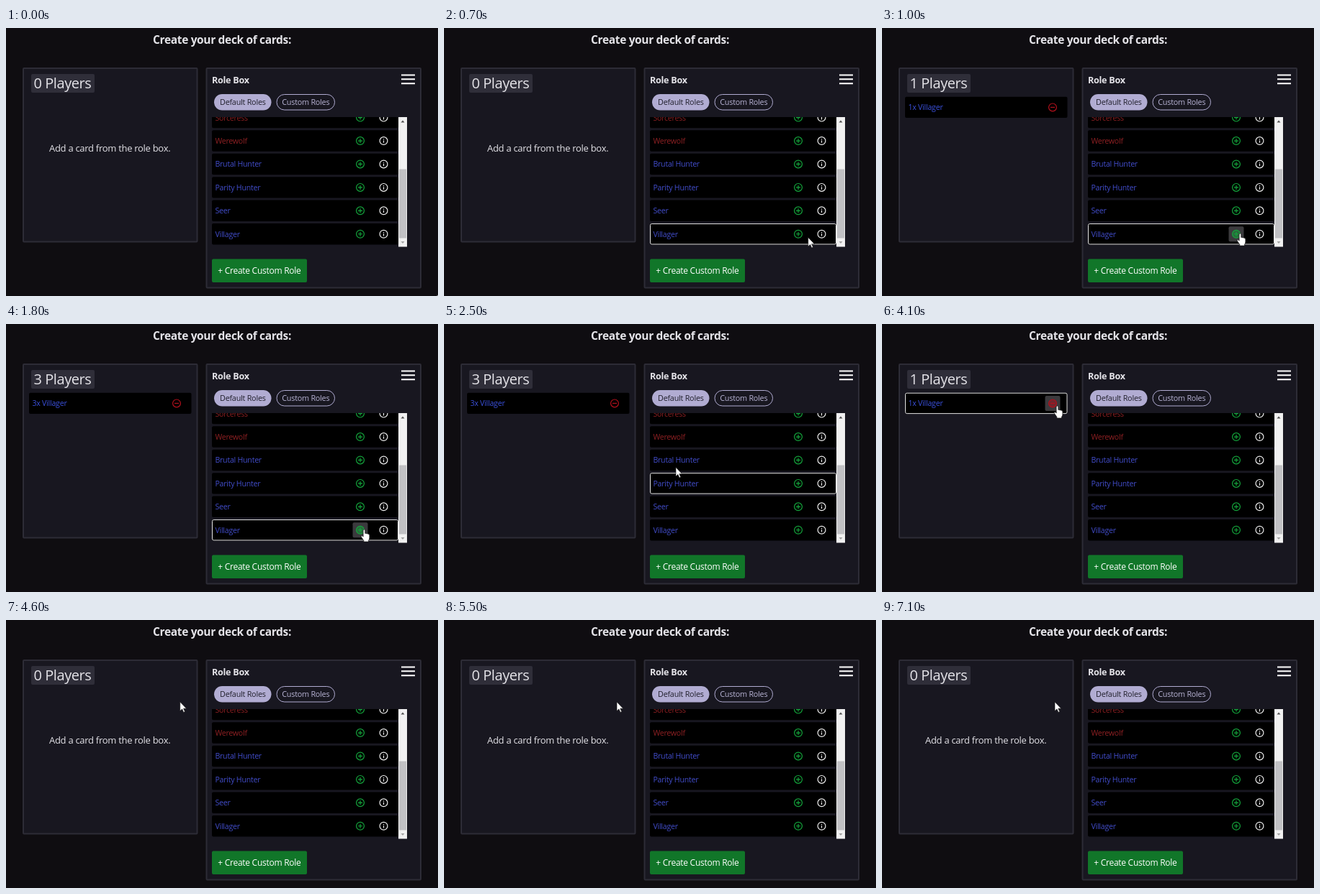
Animation, 600 px wide and 373 px high, one loop 7200 ms. Source, as an HTML page:

```html
<!DOCTYPE html>
<html lang="en">
<head>
<meta charset="utf-8">
<title>Deck builder</title>
<style>
html, body { margin: 0; width: 100%; height: 100%; overflow: hidden; background: #0f0d11; }
svg { display: block; width: 600px; height: 373px; }
text { font-family: "Open Sans", "Noto Sans", sans-serif; font-size: 10.6px; letter-spacing: -.022em; fill: #e4e3e8; }
.bold { font-weight: 700; }
.panel { fill: #181720; stroke: #2d2c36; stroke-width: 2; }
.icon { fill: none; stroke-width: 1.2; }
.hover { fill: none; stroke: #e2e2e2; }
.press { fill: #3b3a3d; }
</style>
</head>
<body>
<svg id="stage" viewBox="0 0 600 373">
  <rect width="600" height="373" fill="#0f0d11"/>
  <text class="bold" x="300" y="21.5" text-anchor="middle" style="font-size:15.5px">Create your deck of cards:</text>

  <rect class="panel" x="24" y="56" width="241.5" height="241.5" rx="1"/>
  <rect x="35" y="64" width="88" height="26" rx="2" fill="#2f2e39"/>
  <text id="total" x="38.5" y="84" style="font-size:20px"></text>
  <text id="empty" x="60" y="172.3" style="font-size:13px">Add a card from the role box.</text>
  <g id="deck"></g>

  <rect class="panel" x="278.5" y="56" width="297.5" height="305.5" rx="1"/>
  <text class="bold" x="286" y="77" style="font-size:12.6px">Role Box</text>
  <path d="M549 65.5h19M549 71.3h19M549 77.2h19" stroke="#fff" stroke-width="2"/>
  <rect x="289" y="92" width="79.5" height="22.5" rx="11.25" fill="#b1acd2"/>
  <text x="297" y="107" style="font-size:10.8px;fill:#201f2b">Default Roles</text>
  <rect x="376" y="92.5" width="80.5" height="21.5" rx="10.75" fill="none" stroke="#b1acd2"/>
  <text x="383.3" y="107" style="font-size:10.8px;fill:#b9b5d6">Custom Roles</text>

  <clipPath id="view"><rect x="285" y="124" width="272" height="180.5"/></clipPath>
  <g id="roles" clip-path="url(#view)"></g>
  <rect x="545" y="124" width="12" height="180.5" fill="#f1f1f1"/>
  <rect x="546" y="196.5" width="10" height="96" fill="#c1c1c4"/>
  <path d="M548.5 131.5l2.5-3 2.5 3z" fill="#505050"/>
  <path d="M548.5 297l2.5 3 2.5-3z" fill="#a3a3a3"/>

  <rect x="286" y="321.5" width="132" height="32.5" rx="2" fill="#117629"/>
  <text x="294.3" y="342.3" style="font-size:12px;fill:#fff">+ Create Custom Role</text>

  <circle id="ripple"/>
  <path id="arrow" d="M0 0v12.6l2.9-2.7 2 4.5 1.9-.8-2-4.4h4z" fill="#fff" stroke="#111" stroke-width=".6"/>
  <path id="hand" d="M-1.4.8Q0-.7 1.3.8V5.5Q2.6 4.7 3.7 6 5 5.2 5.8 6.6 7.3 6.2 7.4 8V12Q7.2 14 6 15.3V17H-.7V15.3L-4.2 10.3Q-4.6 8.4-3 8.6L-1.4 10Z" fill="#fff" stroke="#111" stroke-width=".7"/>
</svg>
<script>
const LOOP = 7200, STEP = 100;
const RED = '#8f2023', BLUE = '#424dcb', GREEN = '#14a53c', MINUS = '#b3101c';
const ROLES = ['Sorceress', 'Werewolf', 'Brutal Hunter', 'Parity Hunter', 'Seer', 'Villager'];
const ADD = [1000, 1400, 1800], REMOVE = [3700, 4100, 4500];
// time, x, y of the pointer tip
const PATH = [
  [0, 598.5, 371], [200, 585, 356], [400, 553, 325], [600, 514, 297], [800, 497.5, 286],
  [2200, 497.5, 286], [2300, 451, 264], [2400, 385, 231], [2500, 322, 199.5],
  [2600, 284, 166], [2700, 261, 141], [2800, 249, 124], [3000, 243.5, 114],
  [4500, 243.5, 114], [4700, 240, 114]
];

const $ = id => document.getElementById(id);
const rowY = i => 124.6 + i * 32.43;

function el(parent, tag, attrs, text) {
  const node = document.createElementNS('http://www.w3.org/2000/svg', tag);
  for (const k in attrs) node.setAttribute(k, attrs[k]);
  if (text) node.textContent = text;
  parent.append(node);
  return node;
}

function icon(parent, x, y, color, mark) {
  const press = el(parent, 'rect', { class: 'press', x: x - 10.5, y: y - 10.5, width: 21, height: 21, rx: 2 });
  const g = el(parent, 'g', { class: 'icon', stroke: color, transform: `translate(${x} ${y})` });
  el(g, 'circle', { r: 5.4 });
  el(g, 'path', { d: mark });
  return { x, press };
}

function makeRow(parent, x, y, width, color, label) {
  el(parent, 'rect', { x, y: y - 14.7, width, height: 29.4, rx: 2, fill: '#000' });
  const outline = el(parent, 'rect', {
    class: 'hover', x: x + .5, y: y - 14.2, width: width - 1, height: 28.4, rx: 2
  });
  const text = el(parent, 'text', { x: x + 4.4, y: y + 3.9, style: `fill:${color}` }, label);
  return { x, y, width, outline, text, buttons: [] };
}

const rows = ROLES.map((name, i) => {
  const row = makeRow($('roles'), 286, rowY(i), 259, i < 2 ? RED : BLUE, name);
  row.buttons = [
    icon($('roles'), 492, row.y, GREEN, 'M-3 0h6M0-3v6'),
    icon($('roles'), 524.5, row.y, '#eee', 'M0-.6v3.4M0-2.8v1.2')
  ];
  return row;
});
const card = makeRow($('deck'), 32, 110.4, 225.5, '#3a50dc', '');
card.buttons = [icon($('deck'), 237, 110.4, MINUS, 'M-3 0h6')];

function pointer(t) {
  const next = PATH.findIndex(p => p[0] > t);
  if (next < 0) return PATH[PATH.length - 1].slice(1);
  const [a, b] = [PATH[Math.max(0, next - 1)], PATH[next]];
  const k = (t - a[0]) / (b[0] - a[0]);
  return [a[1] + (b[1] - a[1]) * k, a[2] + (b[2] - a[2]) * k];
}

const show = (node, on) => node.setAttribute('visibility', on ? 'inherit' : 'hidden');

// Marks what lies under the point; true when it is a button.
function hover(row, x, y) {
  const over = Math.abs(y - row.y) < 15 && x > row.x && x < row.x + row.width;
  let hit = false;
  show(row.outline, over);
  for (const b of row.buttons) {
    const on = over && Math.abs(x - b.x) < 10.5;
    show(b.press, on);
    hit = hit || on;
  }
  return hit;
}

function ripple(t) {
  const start = [...ADD, ...REMOVE].find(c => t >= c && t < c + 300);
  const on = start !== undefined && start !== REMOVE[2];
  show($('ripple'), on);
  if (!on) return;
  const p = (t - start) / 300, adding = start <= ADD[2];
  const attrs = {
    cx: adding ? 492 : 237, cy: adding ? rowY(5) : 110.4,
    r: 5.5 + 4 * p, fill: adding ? GREEN : MINUS, opacity: .45 * (1 - p)
  };
  for (const k in attrs) $('ripple').setAttribute(k, attrs[k]);
}

function draw(t) {
  const past = list => list.filter(c => c <= t).length;
  const count = past(ADD) - past(REMOVE);
  $('total').textContent = count + ' Players';
  card.text.textContent = count + 'x Villager';
  show($('empty'), !count);
  show($('deck'), count);

  const [x, y] = pointer(t);
  const [hx, hy] = pointer(Math.max(0, t - STEP)); // hover trails by one step
  const hits = rows.map(r => hover(r, hx, hy));
  const onCard = hover(card, count ? hx : -99, hy);
  const hand = onCard || hits.includes(true);
  for (const id of ['hand', 'arrow']) {
    show($(id), (id === 'hand') === hand);
    $(id).setAttribute('transform', `translate(${x} ${y})`);
  }
  ripple(t);
}

const begin = performance.now();
function tick(now) {
  const t = Math.max(0, now - begin) % LOOP;
  draw(Math.floor(t / STEP) * STEP);
  requestAnimationFrame(tick);
}
draw(0);
requestAnimationFrame(tick);
</script>
</body>
</html>
```
